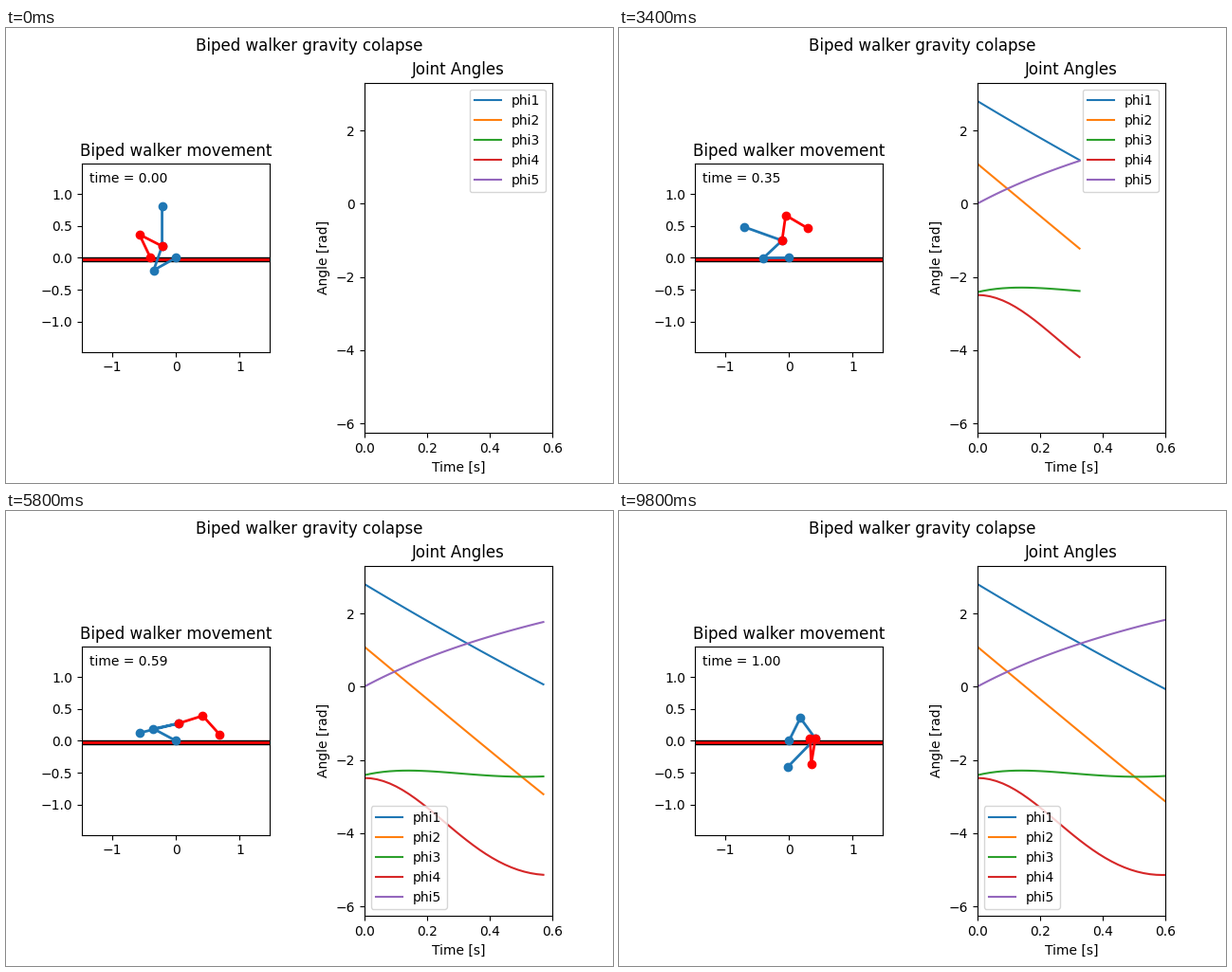
Animation, 640 px wide and 480 px high, one loop 10000 ms. Source, as a matplotlib script:

```python
import numpy as np
import matplotlib.pyplot as plt
from matplotlib.animation import FuncAnimation
from matplotlib.patches import Rectangle

FRAMES = 50
INTERVAL = 200
SHIN, THIGH, TORSO = 0.4, 0.4, 0.625
REACH = SHIN + THIGH + TORSO + 0.05

# Joint angles over one second: legs sweep almost evenly, the torso tips
# with falling speed, the swing knee folds and opens like a pendulum.
t = np.linspace(0, 1, FRAMES)
fold = np.pi * t / 0.587
phi = [
    2.807 - 5.14 * t + 0.594 * t**2,
    1.097 - 7.12 * t + 0.35 * t**4,
    -2.415 + 2.064 * t - 10.357 * t**2 + 15.576 * t**3 - 6.917 * t**4,
    -3.81 + 1.32 * np.cos(fold) - 0.15 * np.sin(fold)**2 - 0.23 * t**6,
    4.6 * t - 4 * t**2 + 3.2 * t**3 - 1.43 * t**4,
]


def link(length, angle):
    """Vector of a link, its angle counted from straight up."""
    return length * np.array([-np.sin(angle), np.cos(angle)])


def pose(i):
    q1, q2, q3, q4, q5 = (p[i] for p in phi)
    foot = np.zeros(2)
    knee = foot - link(SHIN, q1 + q5 - q3)
    hip = knee - link(THIGH, q1 + q5)
    head = hip + link(TORSO, q5)
    swing_knee = hip + link(THIGH, q2 + q5)
    swing_foot = swing_knee + link(SHIN, q2 + q5 - q4)
    return (np.array([foot, knee, hip, head]),
            np.array([hip, swing_knee, swing_foot]))


fig, (walk, plot) = plt.subplots(1, 2, figsize=(6.4, 4.8), dpi=100)
fig.subplots_adjust(wspace=0.5)
fig.suptitle("Biped walker gravity colapse")

walk.set_title("Biped walker movement")
walk.set_aspect("equal")
walk.set_xlim(-REACH, REACH)
walk.set_ylim(-REACH, REACH)
walk.add_patch(Rectangle((-2, -0.05), 4, 0.05, facecolor="red",
                         edgecolor="black", linewidth=1))
stance, = walk.plot([], [], "o-", color="tab:blue", lw=2)
swing, = walk.plot([], [], "o-", color="red", lw=2)
clock = walk.text(0.04, 0.9, "", transform=walk.transAxes)

plot.set_title("Joint Angles")
plot.set_xlabel("Time [s]")
plot.set_ylabel("Angle [rad]")
plot.set_xlim(0, 0.6)
plot.set_ylim(-6.2575, 3.3065)
traces = [plot.plot([], [], label=f"phi{k + 1}")[0] for k in range(5)]
plot.legend(loc="best")


def draw(i):
    for line, points in zip((stance, swing), pose(i)):
        line.set_data(points[:, 0], points[:, 1])
    for trace, p in zip(traces, phi):
        trace.set_data(t[:i], p[:i])
    clock.set_text(f"time = {t[i]:.2f}")
    return stance, swing, clock, *traces


anim = FuncAnimation(fig, draw, frames=FRAMES, interval=INTERVAL,
                     init_func=lambda: draw(0), repeat=True, repeat_delay=0)
plt.show()
```
